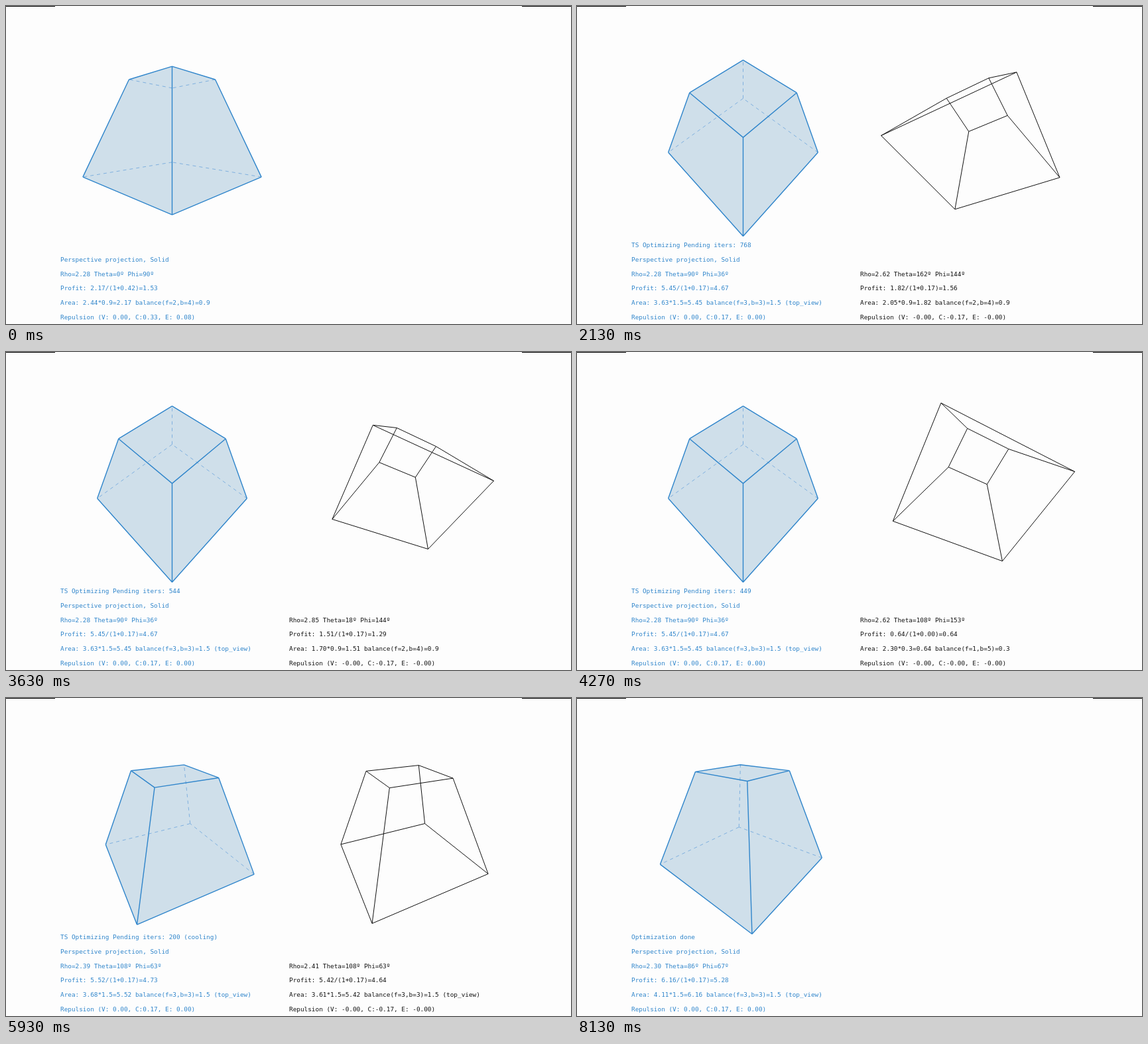
An HTML page with a canvas that plays this animation: 852 px wide and 480 px high, repeating every 8160 ms.

```html
<!DOCTYPE html>
<html lang="en">
<head>
<meta charset="utf-8">
<title>Viewpoint optimization</title>
<style>
html, body { margin: 0; width: 100%; height: 100%; overflow: hidden; background: #fdfdfd; }
canvas { display: block; width: 852px; height: 480px; }
</style>
</head>
<body>
<canvas id="stage" width="852" height="480"></canvas>
<script>
const ctx = document.getElementById('stage').getContext('2d');
const LOOP = 8160, STEP = 100 / 3, FOCAL = 306.9, CY = 185, UNIT = 15710;
const COOLING = 178, DONE = 218, LAST = 244;
const BLUE = '#2f85cb', BLACK = '#111';

// Square frustum: vertices 0-3 are the base, 4-7 the top
const solid = [];
for (const [r, z] of [[1, -0.543], [0.483, 0.55]])
  for (let k = 0; k < 4; k++) solid.push({ r, z, a: k * 90 });

const faces = [[0, 3, 2, 1], [4, 5, 6, 7]];
const edges = [];
for (let k = 0; k < 4; k++) {
  const m = (k + 1) % 4, prev = (k + 3) % 4;
  faces.push([k, m, m + 4, k + 4]);
  // vertex pair, then the two adjacent faces
  edges.push([k, m, 0, k + 2], [k + 4, m + 4, 1, k + 2], [k, k + 4, k + 2, prev + 2]);
}

const pose = (at, theta, phi, rho) => ({ at, theta, phi, rho });
const search = [
  pose(0, 0, 90, 2.28), pose(32, 90, 171, 2.62), pose(64, 162, 144, 2.62),
  pose(109, 18, 144, 2.85), pose(146, 162, 171, 2.62),
  pose(COOLING, 108, 63, 2.41), pose(DONE, 86, 67, 2.3)
];
const best = [pose(0, 0, 90, 2.28), pose(20, 90, 36, 2.28), pose(168, 108, 63, 2.39)];
const final = pose(LAST, 86, 67, 2.3);

const rad = d => d * Math.PI / 180;
const snap = (v, s) => Math.round(v / s) * s;
const noise = (n, k) => {
  const s = Math.sin(n * 127.1 + k * 311.7) * 43758.5453;
  return (s - Math.floor(s)) * 2 - 1;
};
const blend = (a, b, u) => {
  const mix = key => a[key] + (b[key] - a[key]) * u;
  return pose(0, mix('theta'), mix('phi'), mix('rho'));
};

// Wanders on a coarse grid between key poses, then finely while cooling
function trialView(n) {
  if (n > 10 && n < 16) n = 10;
  const i = search.findIndex(p => p.at >= n), a = search[i - 1], b = search[i];
  const u = (n - a.at) / (b.at - a.at), v = blend(a, b, u);
  const spread = Math.sin(Math.PI * u) * (n < COOLING ? 1 : 0.2);
  v.theta += noise(n, 1) * 20 * spread;
  v.phi = Math.min(180, v.phi + noise(n, 2) * 12 * spread);
  v.rho += noise(n, 3) * 0.2 * spread;
  if (n < COOLING) {
    v.theta = (snap(v.theta, 18) + 180) % 180;
    v.phi = snap(v.phi, 9);
    v.rho = 2.28 + Math.max(0, snap(v.rho - 2.28, 0.114));
  }
  return v;
}

function bestView(n) {
  const v = best.filter(p => p.at <= n).pop();
  if (n <= COOLING) return v;
  const u = (n - COOLING) / (LAST - COOLING);
  return blend(v, final, 1 - (1 - u) ** 3);
}

function project(v, cx) {
  const s = Math.sin(rad(v.phi)), c = Math.cos(rad(v.phi));
  return solid.map(p => {
    const a = rad(p.a - v.theta), near = p.r * Math.cos(a);
    const f = FOCAL / (v.rho - s * near - c * p.z);
    return [cx + f * p.r * Math.sin(a), CY - f * (s * p.z - c * near)];
  });
}

// Positive for faces turned to the viewer
const faceArea = (pts, face) => -face.reduce((sum, v, i) => {
  const [x, y] = pts[v], [p, q] = pts[face[(i + 1) % 4]];
  return sum + x * q - p * y;
}, 0) / 2;

function scores(v, areas) {
  const shown = areas.filter(a => a > 1);
  const f = shown.length, top = areas[1] > 1;
  const area = shown.reduce((a, b) => a + b, 0) / UNIT * (top ? 1.598 : 1);
  let balance = f * (6 - f) / 9;
  if (f === 1) balance /= 2;
  if (top && f === 3) balance *= 1.5;
  const level = v.phi === 90;
  const c = f === 1 ? 0 : level ? 1 / 3 : 1 / 6, e = level ? 1 / 12 : 0;
  return { f, top, area, balance, c, e };
}

function report(v, areas, sign) {
  const { f, top, area, balance, c, e } = scores(v, areas);
  const d = x => x.toFixed(2), gain = area * balance;
  return [
    `Rho=${d(v.rho)} Theta=${Math.round(v.theta)}º Phi=${Math.round(v.phi)}º`,
    `Profit: ${d(gain)}/(1+${d(c + e)})=${d(gain / (1 + c + e))}`,
    `Area: ${d(area)}*${balance.toFixed(1)}=${d(gain)} balance(f=${f},b=${6 - f})=${balance.toFixed(1)}${top ? ' (top_view)' : ''}`,
    `Repulsion (V: ${sign}0.00, C:${sign}${d(c)}, E: ${sign}${d(e)})`
  ];
}

// Lines are stacked upwards from the bottom row
function write(lines, x, color) {
  ctx.fillStyle = color;
  ctx.font = '9.4px "DejaVu Sans Mono", monospace';
  lines.forEach((s, i) => ctx.fillText(s, x, 472.5 - (lines.length - 1 - i) * 21.65));
}

function strokeEdges(pts, list, color, width, dash = []) {
  ctx.strokeStyle = color;
  ctx.lineWidth = width;
  ctx.setLineDash(dash);
  ctx.beginPath();
  for (const [a, b] of list) {
    ctx.moveTo(...pts[a]);
    ctx.lineTo(...pts[b]);
  }
  ctx.stroke();
}

function drawSolid(n) {
  const v = bestView(n), pts = project(v, 250.5);
  const areas = faces.map(f => faceArea(pts, f));
  ctx.fillStyle = '#cfdfea';
  ctx.beginPath();
  faces.forEach((face, i) => {
    if (areas[i] <= 0) return;
    face.forEach((k, j) => j ? ctx.lineTo(...pts[k]) : ctx.moveTo(...pts[k]));
    ctx.closePath();
  });
  ctx.fill();
  const seen = e => areas[e[2]] > 1 || areas[e[3]] > 1;
  strokeEdges(pts, edges.filter(e => !seen(e)), '#7fb0df', 1, [5, 5]);
  strokeEdges(pts, edges.filter(seen), BLUE, 1.4);

  const lines = ['Perspective projection, Solid', ...report(v, areas, '')];
  if (n >= DONE) lines.unshift('Optimization done');
  else if (n > 0) {
    const left = Math.max(0, Math.min(1000, Math.round(927 - (n - 32) * 4.98)));
    lines.unshift(`TS Optimizing Pending iters: ${left}${left <= 200 ? ' (cooling)' : ''}`);
  }
  write(lines, 82, BLUE);
}

function drawTrial(n) {
  const v = trialView(n), pts = project(v, 604.5);
  strokeEdges(pts, edges, BLACK, 1);
  write(report(v, faces.map(f => faceArea(pts, f)), '-'), 427, BLACK);
}

function draw(t) {
  const n = Math.min(LAST, Math.floor((t + 3.4) / STEP));
  ctx.fillStyle = '#fdfdfd';
  ctx.fillRect(0, 0, 852, 480);
  ctx.fillStyle = '#000';
  ctx.fillRect(0, 0, 74, 1);
  ctx.fillRect(778, 0, 74, 1);
  ctx.lineCap = 'butt';
  ctx.lineJoin = 'round';
  drawSolid(n);
  if (n > 0 && n < DONE) drawTrial(n);
}

const start = performance.now();
function tick() {
  draw((performance.now() - start) % LOOP);
  requestAnimationFrame(tick);
}
tick();
</script>
</body>
</html>
```
